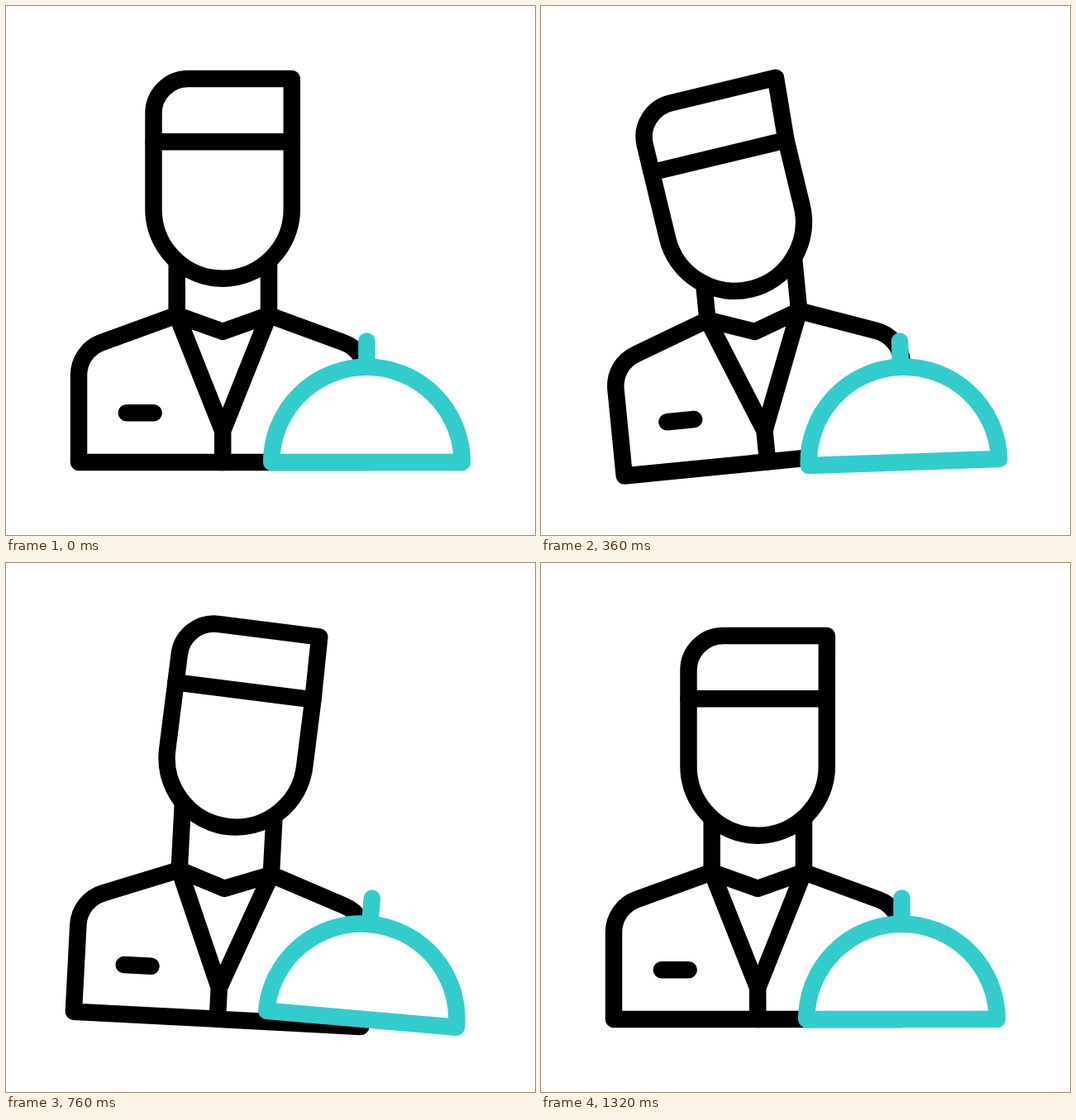
Recreate the animation shown at these times as an HTML page. Size 640 by 640 pixels, loop 1480 ms.

```html
<!DOCTYPE html>
<html lang="en">
<head>
<meta charset="utf-8">
<title>Waiter with a dish</title>
<style>
  html, body { margin: 0; height: 100%; overflow: hidden; background: #fff; }
  svg { display: block; width: 100vw; height: 100vh; }
  path { fill: none; stroke: #000; stroke-width: 20.5; stroke-linecap: round; stroke-linejoin: round; }
  .solid { fill: #fff; }
  #dish path { stroke: #3cc; }
</style>
</head>
<body>
<svg viewBox="0 0 640 640">
  <g id="body">
    <path d="M206.7 260V374M318 260V374"/>
    <path d="M88 552V447C88 429 99 413 116 407L206.7 374L262.2 393.8L318 374L408 407C425 413 436 429 436 447V552Z"/>
    <path d="M206.7 374L262.2 514L318 374M262.2 514V552M145.8 492.2H178.7"/>
    <g id="head">
      <path id="face" class="solid"/>
      <path d="M178.5 164.3H345.8"/>
    </g>
  </g>
  <g id="dish">
    <path d="M436.5 405.5V437"/>
    <path class="solid" d="M321.2 552A115.3 115.3 0 0 1 551.8 552Z"/>
  </g>
</svg>
<script>
const LOOP = 1480, STEP = 40, SWING = 315, HAT_SWING = 250;
const [body, head, face, dish] = ['body', 'head', 'face', 'dish'].map(id => document.getElementById(id));

function ease(x) {
  const a = x ** 2.2, b = (1 - x) ** 2.2;
  return a / (a + b);
}

// Leaves rest at `start`, reaches the first extreme at `peak`,
// then passes one extreme per swing and returns to rest.
function sway(t, start, peak, swing, ...extremes) {
  const swings = (t - peak) / swing;
  const i = Math.max(0, Math.floor(swings) + 1);
  const progress = i ? swings % 1 : Math.max(0, (t - start) / (peak - start));
  const from = extremes[i - 1] ?? 0, to = extremes[i] ?? 0;
  return from + (to - from) * ease(progress);
}

function draw(t) {
  const bodyTurn = sway(t, 40, 425, SWING, -5.8, 3);
  const headTurn = sway(t, 150, 445, SWING, -9, 4.2);
  const headDrop = sway(t, 200, 490, SWING, 20.5, -11.5);
  const dishTurn = sway(t, 240, 525, SWING, -6, 6);
  const tipX = 345.8 + sway(t, 110, 380, HAT_SWING, 5.5, -14, 8.5, 1);

  body.setAttribute('transform', `rotate(${bodyTurn} 262 430)`);
  head.setAttribute('transform', `translate(0 ${headDrop}) rotate(${headTurn} 262 327)`);
  dish.setAttribute('transform', `rotate(${dishTurn} 436.5 478.5)`);
  face.setAttribute('d', `M178.5 130A42 42 0 0 1 220.5 88L${tipX} 88L345.8 164.3V246A83.65 83.65 0 0 1 178.5 246Z`);
}

const start = performance.now();
function tick() {
  const t = (performance.now() - start) % LOOP;
  draw(Math.floor(t / STEP) * STEP);
  requestAnimationFrame(tick);
}
tick();
</script>
</body>
</html>
```
